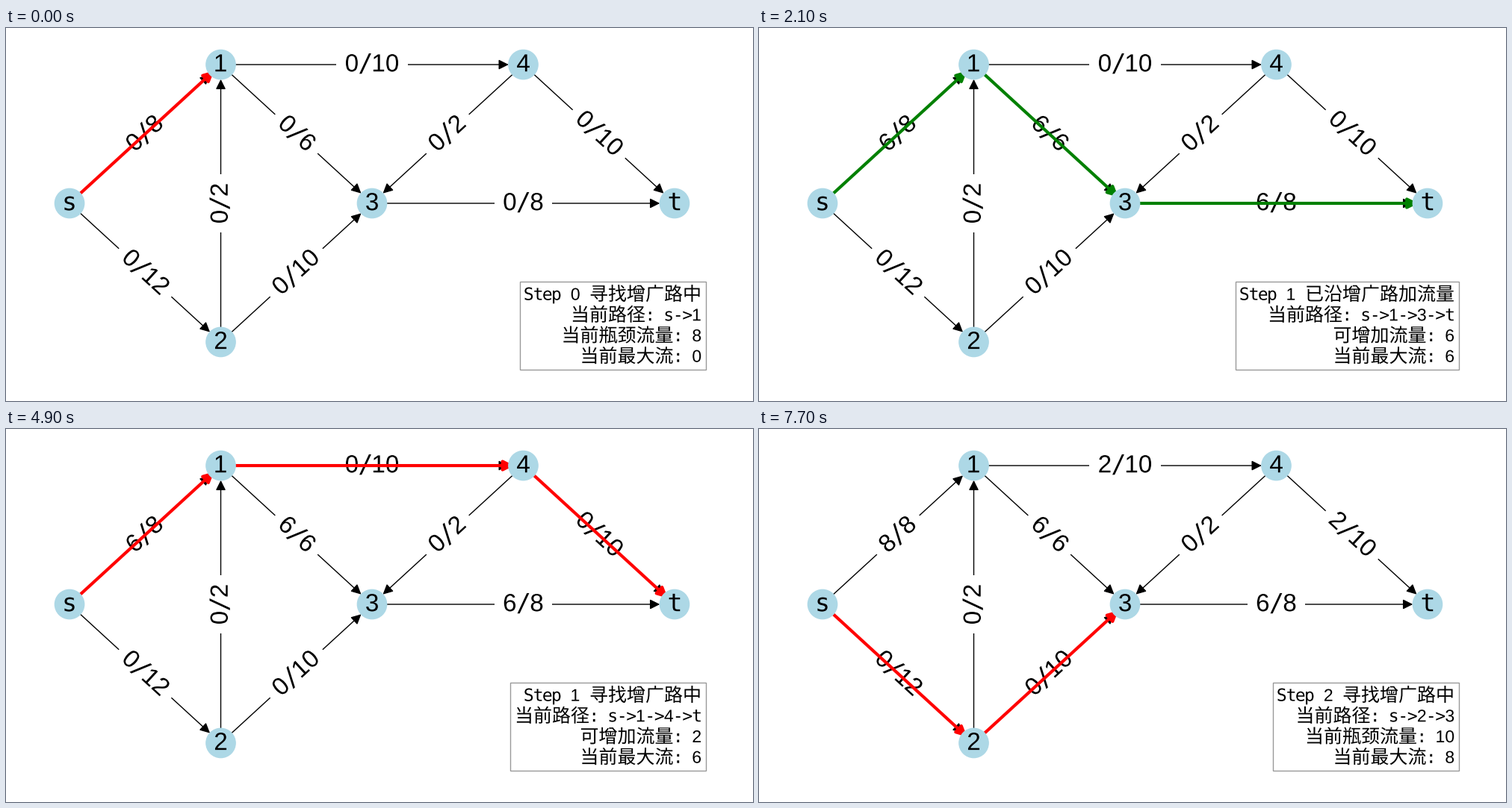
Animation, 1000 px wide and 500 px high, one loop 8000 ms. Source, as a matplotlib script:

```python
import math
import matplotlib.pyplot as plt
from matplotlib.animation import FuncAnimation
from matplotlib.patches import Circle, FancyArrowPatch, PathPatch, Rectangle
from matplotlib.path import Path
from matplotlib.textpath import TextPath
from matplotlib.transforms import Affine2D

W, H, DPI = 1000, 500, 100
PT = DPI / 72
TICK, LOOP = 100, 8000
SEARCH_MS, AUGMENT_MS = 700, 1400

# Graph drawn around (490, 235), with margins of 1.1 * 1.1
DX, DY = 980 / 1.21 / 4, 450 / 1.21 / 2
NODES = {"s": (-2, 0), "1": (-1, -1), "2": (-1, 1),
         "3": (0, 0), "4": (1, -1), "t": (2, 0)}
POS = {n: (490 + DX * i, 235 + DY * j) for n, (i, j) in NODES.items()}
CAPACITY = {"s1": 8, "s2": 12, "13": 6, "14": 10, "21": 2,
            "23": 10, "43": 2, "4t": 10, "3t": 8}
PATHS = ["s13t", "s14t", "s23t"]

LABEL_SIZE = 26 * PT
LABEL_DROP = 9.2
INFO_SIZE = 18 * PT
INFO_PAD = 4 * PT
INFO_RIGHT, INFO_BASE, INFO_STEP = 931, 364.6, 27.7
INFO_TOP, INFO_BOTTOM = 340, 458

fig = plt.figure(figsize=(W / DPI, H / DPI), dpi=DPI, facecolor="white")
ax = fig.add_axes([0, 0, 1, 1])
ax.set_xlim(0, W)
ax.set_ylim(H, 0)
ax.axis("off")


def is_wide(ch):
    return ord(ch) > 0x2E80


def text_width(text, size):
    return sum(size if is_wide(ch) else size / 2 for ch in text)


def glyph(ch, size):
    if is_wide(ch):
        face, scale = "Noto Sans CJK JP", 1
    elif ch.isdigit():
        face, scale = "Liberation Sans", 0.92
    else:
        face, scale = "DejaVu Sans Mono", 0.92
    return TextPath((0, 0), ch, size=size * scale, prop={"family": face})


def text_path(text, size):
    """Lay text on half-em columns, starting at the origin."""
    parts, x = [], 0
    for ch in text:
        width = text_width(ch, size)
        if ch != " ":
            shape = glyph(ch, size)
            if is_wide(ch):
                move = Affine2D().translate(x, -0.02 * size)
            else:
                box = shape.get_extents()
                move = Affine2D().translate(x + width / 2 - (box.x0 + box.x1) / 2, 0)
            parts.append(shape.transformed(move))
        x += width
    return Path.make_compound_path(*parts)


def put_text(text, x, y, size, zorder, angle=0, left=0, drop=0):
    place = (Affine2D().translate(left, -drop).rotate_deg(angle)
             .scale(1, -1).translate(x, y))
    patch = PathPatch(text_path(text, size), fc="black", lw=0,
                      transform=place + ax.transData, zorder=zorder)
    return ax.add_patch(patch)


def put_centered(text, x, y, zorder, angle=0):
    left = -text_width(text, LABEL_SIZE) / 2
    return put_text(text, x, y, LABEL_SIZE, zorder, angle, left, LABEL_DROP)


def put_arrow(edge, color, width, node_size, zorder):
    shrink = math.sqrt(node_size) / 2
    arrow = FancyArrowPatch(POS[edge[0]], POS[edge[1]], arrowstyle="-|>",
                            mutation_scale=20, shrinkA=shrink, shrinkB=shrink,
                            color=color, lw=width, zorder=zorder)
    return ax.add_patch(arrow)


def edge_middle(edge):
    (x0, y0), (x1, y1) = POS[edge[0]], POS[edge[1]]
    angle = math.degrees(math.atan2(y0 - y1, x1 - x0))
    if abs(angle) > 90:
        angle -= math.copysign(180, angle)
    return (x0 + x1) / 2, (y0 + y1) / 2, angle


def put_gap(edge):
    x, y, angle = edge_middle(edge)
    w = text_width(f"0/{CAPACITY[edge]}", LABEL_SIZE) + 0.6 * LABEL_SIZE + PT
    h = 1.45 * LABEL_SIZE
    place = Affine2D().rotate_deg(-angle).translate(x, y)
    ax.add_patch(Rectangle((-w / 2, -h / 2), w, h, fc="white", lw=0,
                           transform=place + ax.transData, zorder=2))


def put_info(lines):
    width = max(text_width(line, INFO_SIZE) for line in lines)
    box = Rectangle((INFO_RIGHT - width - INFO_PAD, INFO_TOP),
                    width + 2 * INFO_PAD, INFO_BOTTOM - INFO_TOP,
                    fc="white", ec="black", lw=1, alpha=0.4, zorder=6)
    parts = [ax.add_patch(box)]
    for i, line in enumerate(lines):
        x = INFO_RIGHT - text_width(line, INFO_SIZE)
        parts.append(put_text(line, x, INFO_BASE + i * INFO_STEP, INFO_SIZE, 7))
    return parts


def build_scene(flow, route, color, lines):
    parts = put_info(lines)
    for edge, cap in CAPACITY.items():
        x, y, angle = edge_middle(edge)
        parts.append(put_centered(f"{flow[edge]}/{cap}", x, y, 3, angle))
    parts += [put_arrow(edge, color, 3, 300, 4) for edge in route]
    for part in parts:
        part.set_visible(False)
    return parts


def build_scenes():
    """Run the max-flow search; return (start time, artists) pairs."""
    scenes, now, total = [], 0, 0
    flow = dict.fromkeys(CAPACITY, 0)
    for step, path in enumerate(PATHS):
        edges = [a + b for a, b in zip(path, path[1:])]
        for n in range(1, len(edges) + 1):
            if now >= LOOP:
                return scenes
            room = min(CAPACITY[e] - flow[e] for e in edges[:n])
            kind = "可增加流量" if n == len(edges) else "当前瓶颈流量"
            lines = [f"Step {step} 寻找增广路中",
                     "当前路径: " + "->".join(path[:n + 1]),
                     f"{kind}: {room}", f"当前最大流: {total}"]
            scenes.append((now, build_scene(flow, edges[:n], "red", lines)))
            now += SEARCH_MS
        for e in edges:
            flow[e] += room
        total += room
        lines[0] = f"Step {step + 1} 已沿增广路加流量"
        lines[3] = f"当前最大流: {total}"
        scenes.append((now, build_scene(flow, edges, "green", lines)))
        now += AUGMENT_MS
    return scenes


for edge in CAPACITY:
    put_arrow(edge, "black", 1, 800, 1)
    put_gap(edge)
for name, (x, y) in POS.items():
    ax.add_patch(Circle((x, y), math.sqrt(800) / 2 * PT, fc="lightblue",
                        ec="lightblue", lw=1, zorder=5))
    put_centered(name, x, y, 6)

SCENES = build_scenes()


def update(frame):
    now = frame * TICK
    current = max(i for i, (start, _) in enumerate(SCENES) if start <= now)
    for i, (_, parts) in enumerate(SCENES):
        for part in parts:
            part.set_visible(i == current)
    return SCENES[current][1]


anim = FuncAnimation(fig, update, frames=LOOP // TICK, interval=TICK,
                     repeat=True, repeat_delay=0, blit=False)
plt.show()
```
